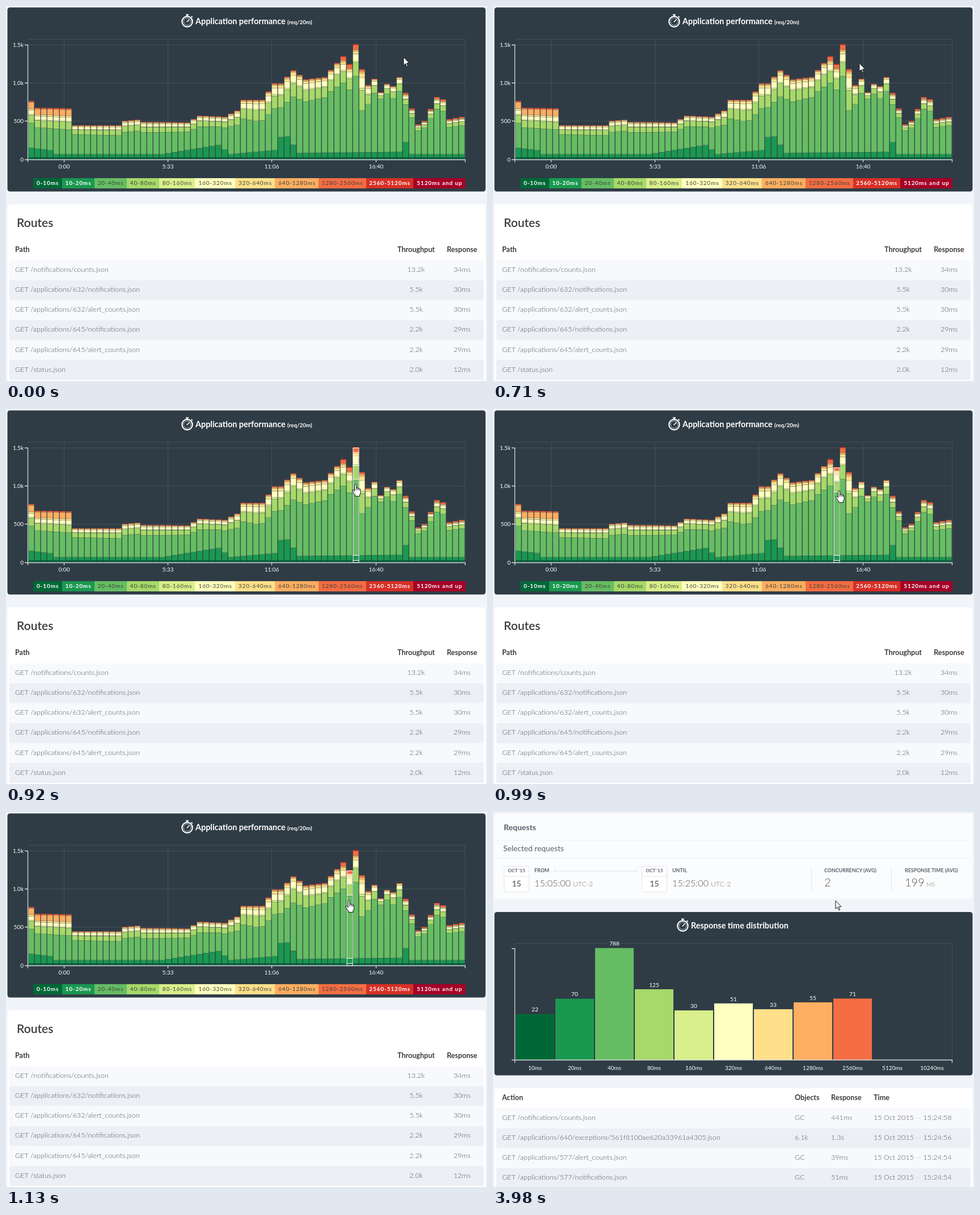
Recreate the animation shown at these times as an HTML page. Size 848 by 660 pixels, loop 8 s.

```html
<!DOCTYPE html>
<html lang="en">
<head>
<meta charset="utf-8">
<title>Application performance</title>
<style>
html, body { margin: 0; width: 100%; height: 100%; overflow: hidden; background: #f1f4f9; }
svg { display: block; width: 848px; height: 660px; font-family: Lato, sans-serif; }
text { white-space: pre; }
</style>
</head>
<body>
<svg id="stage" viewBox="0 0 848 660"></svg>
<script>
const LOOP = 8000, STEP = 70, MOVE = 500, REST = 1130, CLICK = 3910, SWITCH = 3980;
const DARK = '#2f3c46', GRID = '#42505a', AXIS = '#d5d9dc', INK = '#3b3b3b', SOFT = '#575757', LABEL = '#5c616b';
const COLORS = ['#006837', '#1a9850', '#66bd63', '#a6d96a', '#d9ef8b', '#ffffbf',
  '#fee08b', '#fdae61', '#f46d43', '#d73027', '#a50026'];

const attrs = o => Object.entries(o).map(([k, v]) => ` ${k}="${v}"`).join('');
const rect = (x, y, width, height, fill, more = {}) =>
  `<rect${attrs({ x, y, width, height, fill, ...more })}/>`;
const path = (d, stroke, more = {}) => `<path${attrs({ d, stroke, fill: 'none', ...more })}/>`;
const text = (x, y, str, size, fill, weight = 400, anchor = 'start', more = {}) =>
  `<text${attrs({ x, y, 'font-size': size, fill, 'font-weight': weight, 'text-anchor': anchor, ...more })}>${str}</text>`;
const panel = (y, h, fill) => rect(2.5, y, 843, h, fill, { rx: 4.5 });
const range = n => [...Array(n).keys()];

// Piecewise linear curve through x, y pairs
function curve(...p) {
  return x => {
    let i = 0;
    while (i < p.length - 4 && x > p[i + 2]) i += 2;
    const k = Math.min(1, Math.max(0, (x - p[i]) / (p[i + 2] - p[i])));
    return p[i + 1] + k * (p[i + 3] - p[i + 1]);
  };
}

function stopwatch(x, y) {
  return `<g transform="translate(${x} ${y})" fill="none" stroke="#fff">
    <circle r="9.2" stroke-width="2.2"/><circle r="6.4" stroke="#aeb5ba" stroke-width="1"/>
    <path d="M-2.5 -12H2.5M0 -12V-9M7.2 -9.4L9.2 -7.4" stroke-width="2"/>
    <path d="M-.8 .8L4 -4" stroke-width="1.6"/></g>`;
}

// --- Stacked chart ---
const BASE = 270, LEFT = 39, PITCH = 11, BARS = 70;
// Height of a bar, its part under 20 ms, and the shares of the slower bands
const total = curve(0, 103, 1, 91, 6, 90, 7, 60, 14, 60, 15, 68, 17, 70, 18, 66, 25, 65, 27, 77, 31, 75,
  33, 86, 34, 105, 37, 105, 39, 134, 40, 134, 42, 157, 44, 141, 47, 145, 50, 182, 51, 168, 52, 203,
  53, 159, 54, 131, 55, 142, 56, 118, 57, 133, 58, 129, 59, 145, 62, 62, 63, 68, 65, 110, 66, 106, 67, 71, 69, 75);
const fast = curve(0, 20, 3, 16, 4, 9, 21, 9, 30, 25, 32, 9, 39, 16, 40, 39, 41, 40, 43, 11, 59, 13, 60, 30, 61, 9);
const slow = curve(0, .38, 6, .42, 7, .27, 14, .3, 30, .24, 36, .36, 48, .24, 52, .28, 53, .46, 54, .26, 56, .1, 58, .17, 69, .21);
const orange = curve(6, .28, 7, .05);
const red = curve(6, .07, 7, .02, 49, .04, 50, .17, 52, .17, 53, .05, 59, .02, 60, .16);

function segments(i) {
  const sum = total(i), tail = slow(i) * sum, hot = red(i), mild = 1 - orange(i) - hot;
  const shares = [.54 * mild, .06 * mild, .28 * mild, .12 * mild, orange(i), .8 * hot, .2 * hot];
  const edges = [0, 3.5, fast(i), sum - tail];
  shares.forEach(s => edges.push(edges[edges.length - 1] + s * tail));
  return edges.slice(1).map((e, k) => ({ top: BASE - e, h: e - edges[k], fill: COLORS[k] }));
}
const bars = range(BARS).map(segments);

function stackedChart() {
  const xs = range(4).map(i => Math.floor(102 + 183.4 * i) + .5);
  const ys = range(4).map(i => Math.floor(BASE - 67.3 * i) + .5);
  let s = panel(2.5, 324, DARK) + stopwatch(319.5, 27.5) +
    text(334, 32, 'Application performance', 14.4, '#fff', 700) +
    text(496, 31.5, '(req/20m)', 9.8, '#fff', 700) +
    path('M39 58.5H809.5V270' + xs.map(x => `M${x} 58V270`).join('') +
      ys.map(y => `M39 ${y}H809`).join(''), GRID);
  bars.forEach((bar, i) => bar.forEach(b => {
    s += rect(LEFT + PITCH * i + .75, b.top, 9.75, Math.max(.5, b.h - .35), b.fill);
  }));
  s += path('M38.5 68V275M38 270.5H809.5V275' + ys.map(y => `M33 ${y}H38`).join('') +
    xs.map(x => `M${x} 270V275`).join(''), AXIS, { 'stroke-width': 1.3 });
  ['0', '500', '1.0k', '1.5k'].forEach((l, i) => s += text(31, ys[i] + 3.5, l, 10, '#fff', 400, 'end'));
  ['0:00', '5:33', '11:06', '16:40'].forEach((l, i) => s += text(xs[i], 286, l, 10, '#fff', 400, 'middle'));
  return s + legend();
}

function legend() {
  let x = 48;
  return COLORS.map((c, i) => {
    const lo = i ? 5 * 2 ** i : 0, light = i < 2 || i > 8, last = i === 10;
    const label = last ? `${lo}ms and up` : `${lo}-${10 * 2 ** i}ms`;
    const w = last ? 810 - x : 6.6 * label.length + 10.9;
    const s = rect(Math.round(x), 303, Math.ceil(w), 18, c) +
      text(x + w / 2 + .4, 315.3, label, 10, light ? '#fff' : '#3c4238',
        light ? 700 : 400, 'middle', { 'letter-spacing': .9 });
    x += w;
    return s;
  }).join('');
}

// --- Tables ---
function table(y, headY, cols, rows) {
  let s = panel(y, 330, '#fff');
  cols.forEach(([x, label, anchor]) => s += text(x, headY, label, 12.6, INK, 700, anchor));
  rows.forEach((cells, r) => {
    const top = headY + 14.5 + r * 35.1;
    s += rect(6, top, 836, 35.1, r % 2 ? '#eceff4' : '#f7f9fc');
    cells.forEach((c, k) => s += text(cols[k][0], top + 20.6, c, 12.6, SOFT, 300, cols[k][2]));
  });
  return s;
}
const get = p => `GET /${p}.json`;

function overview() {
  const cols = [[16, 'Path'], [723, 'Throughput', 'middle'], [804, 'Response', 'middle']];
  return stackedChart() + table(349, 433, cols, [
    [get('notifications/counts'), '13.2k', '34ms'],
    [get('applications/632/notifications'), '5.5k', '30ms'],
    [get('applications/632/alert_counts'), '5.5k', '30ms'],
    [get('applications/645/notifications'), '2.2k', '29ms'],
    [get('applications/645/alert_counts'), '2.2k', '29ms'],
    [get('status'), '2.0k', '12ms']
  ]) + text(19, 389, 'Routes', 21, INK, 600);
}

// --- Detail page ---
function dateBox(x, label, time) {
  return rect(x + .5, 95.5, 44, 45, '#fff', { rx: 2, stroke: '#e2e5ea' }) +
    path(`M${x} 113.5h45`, '#e2e5ea') +
    text(x + 22.5, 106.3, "OCT '15", 8.4, LABEL, 700, 'middle') +
    text(x + 22.5, 131, '15', 14, '#444', 400, 'middle') +
    text(x + 54, 106.3, label, 8.9, LABEL, 700) +
    text(x + 54, 130.5, time, 16.2, SOFT, 300) +
    text(x + 122, 130.5, 'UTC-2', 12.2, '#777', 300);
}

const stat = (x, label, value) =>
  text(x, 106.3, label, 8.9, LABEL, 700) + text(x, 131, value, 20, SOFT, 300);

function distribution() {
  let s = panel(176, 287.5, DARK) + stopwatch(334.5, 200.5) +
    text(349, 204.5, 'Response time distribution', 14.4, '#fff', 700) +
    path('M39 231.5H809.5V436M38.5 231V240', GRID);
  [22, 70, 788, 125, 30, 51, 33, 55, 71].forEach((n, i) => {
    const h = 37.1 * n ** .25;
    s += rect(40 + 70 * i, 436 - h, 68, h, COLORS[i]) +
      text(74 + 70 * i, 431.7 - h, n, 10.2, '#fff', 400, 'middle');
  });
  s += path('M33 240.5H38.5V436.5H33M38.5 441.5V436.5H809.5V441.5', AXIS, { 'stroke-width': 1.3 });
  COLORS.forEach((_, i) => s += text(74 + 70 * i, 454, 10 * 2 ** i + 'ms', 10, '#fff', 400, 'middle'));
  return s;
}

function detail() {
  const when = sec => `15 Oct 2015 <tspan fill="#bbb">—</tspan> 15:24:${sec}`;
  const cols = [[16, 'Action'], [532, 'Objects'], [596, 'Response'], [671, 'Time']];
  return panel(2.5, 150.5, '#fbfcfd') + path('M3 49.5H845M3 81.5H845', '#eceff3') +
    text(19, 31.5, 'Requests', 14, '#5a606c', 700) +
    text(18, 69.3, 'Selected requests', 13.8, '#5a5e66') +
    dateBox(19, 'FROM', '15:05:00') + dateBox(262, 'UNTIL', '15:25:00') +
    path('M108.5 101V107M108 104H253M253.5 101V107', '#dfe2e7') +
    path('M561.5 97V138M702.5 97V138', '#c9cdd3', { 'stroke-dasharray': '1 1' }) +
    stat(584, 'CONCURRENCY (AVG)', '2') + stat(726, 'RESPONSE TIME (AVG)', '199') +
    text(764, 131, 'MS', 10.6, '#777', 300) +
    distribution() +
    table(486, 507, cols, [
      [get('notifications/counts'), 'GC', '441ms', when(58)],
      [get('applications/640/exceptions/561f8100ae620a33961a4305'), '6.1k', '1.3s', when(56)],
      [get('applications/577/alert_counts'), 'GC', '39ms', when(54)],
      [get('applications/577/notifications'), 'GC', '51ms', when(54)]
    ]);
}

const ARROW = 'M0 0V14.5L3.3 11.4L5.6 16.8L7.6 16L5.4 10.7H10Z';
const HAND = 'M5 2.2Q5 .7 6.5 .7T8 2.2V7.2Q9.3 6.3 10.8 7.6Q12.4 7 13.4 8.5Q15.4 8.3 15.4 11V15Q15.2 17 13.8 19V21.5H6V19.5Q4.3 17.5 3.3 15.5L.9 12.2Q.5 10.4 2.2 10.4L5 12.8Z';
const KNUCKLES = 'M8 7.2V11M10.8 7.6V11M13.4 8.5V11.5';

document.getElementById('stage').innerHTML = `
  <rect width="848" height="660" fill="#f1f4f9"/>
  <g id="overview">${overview()}<g id="hover"></g></g>
  <g id="detail">${detail()}</g>
  <circle id="ring" cx="594.5" cy="152" r="10" fill="none" stroke="#fbf200" stroke-width="2.6"/>
  <g id="cursor" stroke="#111" stroke-width="1" fill="#fff" stroke-linejoin="round">
    <path id="arrow" d="${ARROW}"/>
    <g id="hand" transform="translate(-6 -1)"><path d="${HAND}"/><path d="${KNUCKLES}" fill="none"/></g>
  </g>`;

const el = Object.fromEntries(['overview', 'hover', 'detail', 'ring', 'cursor', 'arrow', 'hand']
  .map(id => [id, document.getElementById(id)]));
const show = (node, on) => node.setAttribute('display', on ? 'inline' : 'none');
const smooth = u => u * u * (3 - 2 * u);

// The pointer slows down sideways while it drops, in ticks of STEP
function pointer(t) {
  if (t < MOVE) return [701, 90];
  const tick = MOVE + Math.floor((t - MOVE) / STEP) * STEP;
  const u = Math.min(1, (tick - MOVE) / (REST - MOVE));
  return [604 + 88 * (1 - u) ** 1.83, 90 + 66 * smooth(u ** 1.25)];
}

let hovered = -1;
function highlight(i) {
  if (i === hovered) return;
  hovered = i;
  el.hover.innerHTML = i < 0 ? '' : bars[i].filter(b => b.h > 2).map(b =>
    rect(LEFT + PITCH * i + 1, Math.round(b.top) - .5, 10, Math.round(b.h), 'none', { stroke: '#fff' })).join('');
}

function draw(t) {
  const inDetail = t >= SWITCH;
  const [x, y] = pointer(t);
  const bar = Math.floor((x - LEFT) / PITCH);
  const over = !inDetail && y >= BASE - total(bar);
  show(el.overview, !inDetail);
  show(el.detail, inDetail);
  show(el.ring, t >= CLICK && !inDetail);
  show(el.arrow, !over);
  show(el.hand, over);
  el.cursor.setAttribute('transform', `translate(${x} ${y})`);
  highlight(over ? bar : -1);
}

const start = performance.now();
function frame() {
  draw((performance.now() - start) % LOOP);
  requestAnimationFrame(frame);
}
draw(0);
requestAnimationFrame(frame);
</script>
</body>
</html>
```
